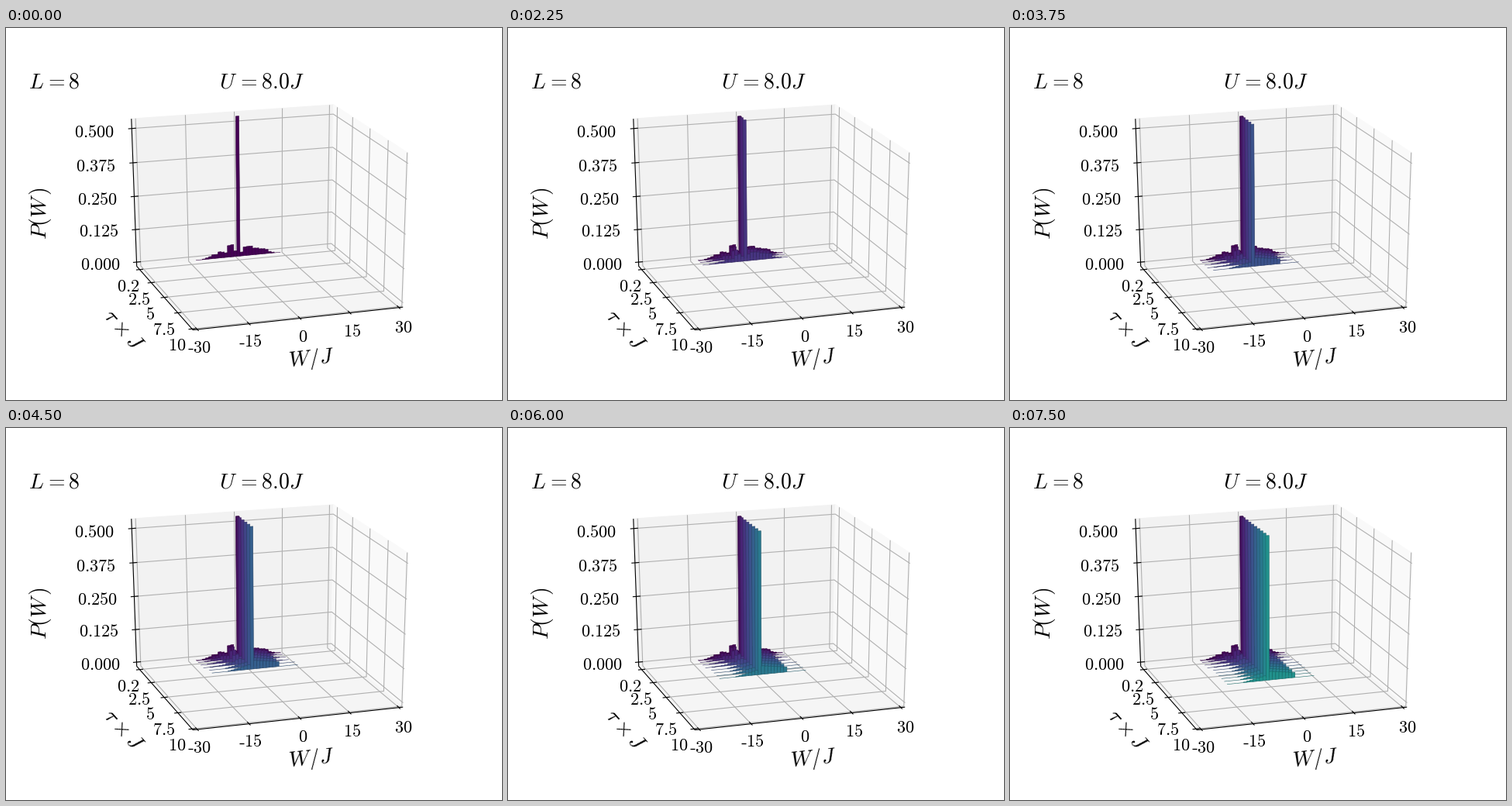
A matplotlib script for the animation above (8000 ms loop, 640 px wide and 480 px high).

```python
import numpy as np
import matplotlib.pyplot as plt
from matplotlib.animation import FuncAnimation
from matplotlib.collections import PolyCollection

plt.rcParams["mathtext.fontset"] = "cm"

W0, W1 = -31.25, 31.25      # work axis, with margins
T0, T1 = -0.4, 10.15        # time axis, growing towards the viewer
P0, P1 = -0.016, 0.535      # probability axis

GRID = (0.69, 0.69, 0.69)
SETS = 11
STEP_MS, HOLD_MS, LOOP_MS = 250, 750, 8000

# Known points of the box: W, t, P and the pixel they land on
ANCHORS = np.array([
    (W0, T0, P0, 168, 308), (W0, T1, P0, 240, 388),
    (W1, T1, P0, 511, 361), (W1, T0, P0, 418.5, 281.8),
    (W0, T0, P1, 162, 117), (W1, T1, P1, 518, 160),
    (W1, T0, P1, 422, 98), (0, T0, P1, 294, 107),
    (0, T0, P0, 296, 295), (0, T1, P0, 379, 374),
    (-15, T0, P0, 235, 301), (-15, T1, P0, 313, 381),
    (15, T0, P0, 357, 288), (15, T1, P0, 445, 367),
    (W0, T0, 0.25, 164, 217), (W1, T0, 0.25, 420, 196),
    (W1, T1, 0.25, 515, 267), (W1, 5, P0, 464, 320),
    (W0, 5, P0, 204, 346.5), (W1, 5, P1, 470, 130),
])
SCALE = np.array([30, 10, 0.5])


def fit_camera(anchors):
    """Least-squares 3x4 projection matrix."""
    rows, rhs = [], []
    for *pos, u, v in anchors:
        q = np.array(pos) / SCALE
        h = np.append(q, 1)
        rows.append(np.concatenate([h, np.zeros(4), -u * q]))
        rows.append(np.concatenate([np.zeros(4), h, -v * q]))
        rhs += [u, v]
    sol = np.linalg.lstsq(np.array(rows), np.array(rhs), rcond=None)[0]
    return np.append(sol, 1).reshape(3, 4)


CAMERA = fit_camera(ANCHORS)


def project(points):
    q = np.atleast_2d(np.array(points, float)) / SCALE
    h = np.column_stack([q, np.ones(len(q))]) @ CAMERA.T
    return h[:, :2] / h[:, 2:]


fig = plt.figure(figsize=(6.4, 4.8), dpi=100, facecolor="white")
ax = fig.add_axes([0, 0, 1, 1])
ax.set_xlim(-0.5, 639.5)
ax.set_ylim(479.5, -0.5)
ax.axis("off")


def pane(points, shade):
    ax.add_patch(plt.Polygon(project(points), fc=str(shade), ec=str(shade),
                             lw=0.8, zorder=0))


def line(points, color, z):
    ax.plot(*project(points).T, color=color, lw=0.8, zorder=z,
            solid_capstyle="butt")


def tick(point, dx, dy, back, ahead):
    x, y = project(point)[0]
    ax.plot([x - back * dx, x + ahead * dx], [y - back * dy, y + ahead * dy],
            color="black", lw=0.8, zorder=2)


def label(x, y, text, size=16, **kw):
    kw = {"ha": "center", "va": "baseline", **kw}
    ax.text(x, y, f"${text}$", size=size, color="black", zorder=3, **kw)


# Walls and floor
pane([(W0, T0, P0), (W1, T0, P0), (W1, T0, P1), (W0, T0, P1)], 0.95)
pane([(W1, T0, P0), (W1, T1, P0), (W1, T1, P1), (W1, T0, P1)], 0.975)
pane([(W0, T0, P0), (W1, T0, P0), (W1, T1, P0), (W0, T1, P0)], 0.9625)

# Grid, ticks and tick labels
w_ticks = [(-30, 249, 411), (-15, 315, 403.5), (0, 383, 397.5),
           (15, 446, 390), (30, 512, 385)]
for w, x, y in w_ticks:
    line([(w, T0, P1), (w, T0, P0), (w, T1, P0)], GRID, 1)
    tick((w, T1, P0), 0.7, 0.72, 3, 2)
    base = y + 7.3
    if w < 0:
        ax.plot([x - 14.5, x - 8.5], [base - 4.8] * 2, color="black", lw=1,
                solid_capstyle="butt", zorder=3)
        x += 3.5
    label(x, base, abs(w))

t_ticks = [(0.2, 157, 332), (2.5, 171, 349), (5, 186, 368),
           (7.5, 203, 388), (10, 220, 408)]
for t, x, y in t_ticks:
    line([(W1, t, P1), (W1, t, P0), (W0, t, P0)], GRID, 1)
    tick((W0, t, P0), 1, -0.1, 4, 4)
    label(x, y + 7.3, t)

for i, y in enumerate([303, 260.5, 219, 176, 132]):
    p = i * 0.125
    line([(W0, T0, p), (W1, T0, p), (W1, T1, p)], GRID, 1)
    tick((W0, T0, p), 1, -0.08, 4, 5)
    label(121 - 2 * i, y + 8.3, f"{p:.3f}")

# Axis lines and titles
line([(W0, T0, P1), (W0, T0, P0), (W0, T1, P0), (W1, T1, P0)], "black", 2)
label(62, 76.5, r"L\hspace{0.06}=8", 20)
label(329, 77.5, r"U\hspace{0.14}=\hspace{0.04}8.0J", 20)
label(44, 238.7, r"P(W\hspace{0.1})", 20, rotation=90, va="center")
label(394, 427, "W/J", 20, rotation=5.7, va="center")
label(151, 388.5, r"\tau\times J", 20, rotation=-48, va="center")

# Early profile in thousandths, bins -13 to 13
EARLY = np.array([0, 0, 2, 5, 9, 15, 15, 24, 22, 18, 45, 47, 22, 529,
                  15, 34, 35, 35, 26, 25, 21, 20, 16, 7, 3, 0, 0]) / 1000
TAUS = [0.1, 0.2] + [0.5 * i for i in range(1, SETS - 1)]


def late_height(n):
    if n == 0:
        return 0.53
    if n > 0:
        return 0.034 - 0.0018 * n if n <= 8 else 0
    return max(0, 0.02 + 0.0026 * n)


def height(n, k):
    early = EARLY[n + 13] if abs(n) <= 13 else 0
    mix = min(k / 5, 1)
    return (1 - mix) * early + mix * late_height(n)


def bar_set(k):
    t = 0.98 * TAUS[k] + 0.15
    shift = int(k >= 5)
    faces = []
    for n in range(-13 + shift, 14 + shift):
        a, b, h = n - 0.75, n + 0.25, height(n, k)
        faces.append(project([(a, t, 0), (b, t, 0), (b, t, h), (a, t, h)]))
    color = np.array(plt.cm.viridis(k / 20)[:3])
    bars = PolyCollection(faces, facecolors=[color], edgecolors=[color * 0.72],
                          linewidths=0.4, zorder=4 + 0.1 * k)
    ax.add_collection(bars, autolim=False)
    return bars


layers = [bar_set(k) for k in range(SETS)]


def draw(i):
    last = i * STEP_MS // HOLD_MS
    for k, bars in enumerate(layers):
        bars.set_visible(k <= last)
    return layers


anim = FuncAnimation(fig, draw, frames=LOOP_MS // STEP_MS, interval=STEP_MS,
                     init_func=lambda: draw(0), repeat=True, repeat_delay=0,
                     blit=False)
plt.show()
```
